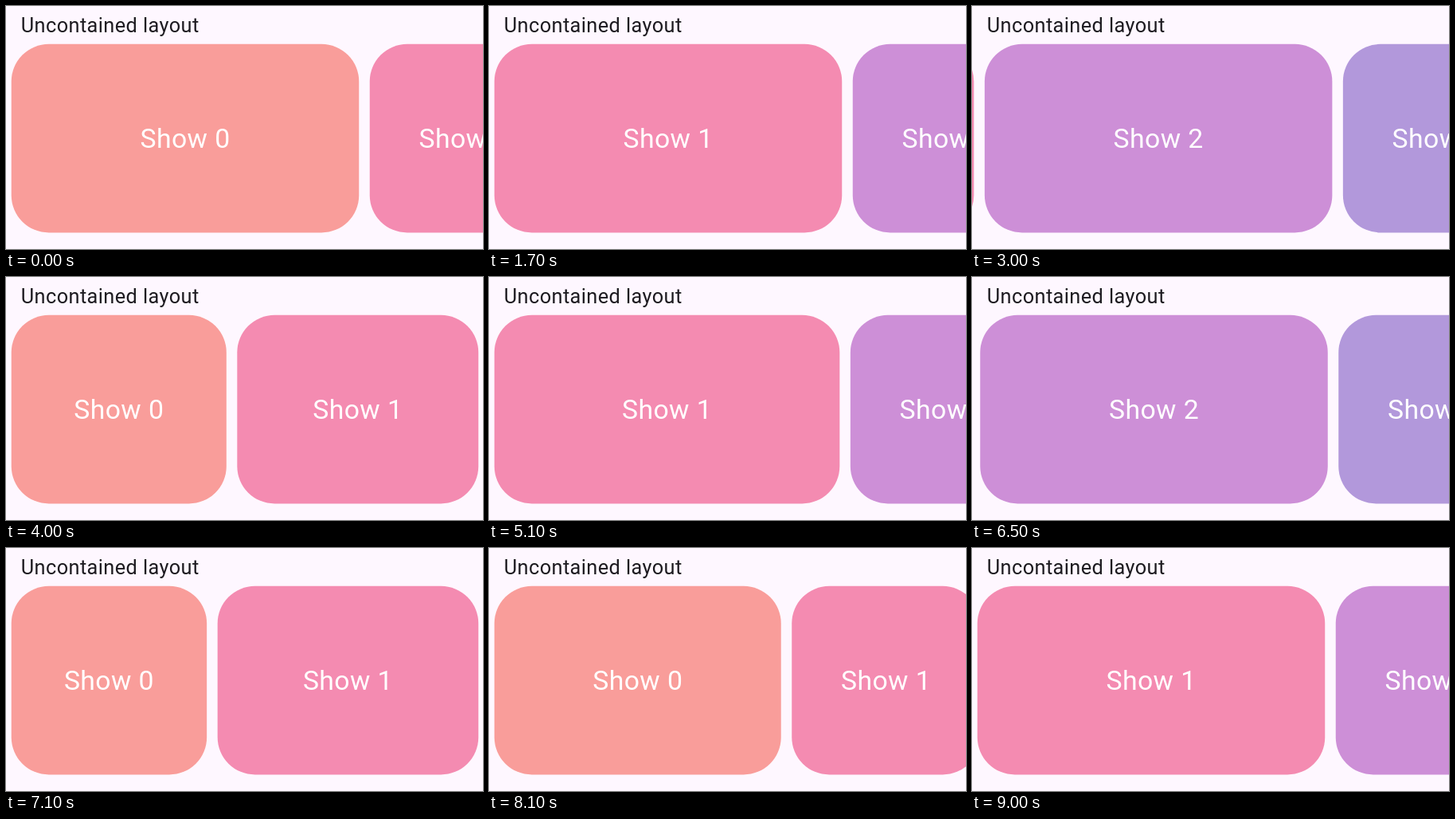
Animation of 599x305 px, one loop 9.2 s. Source, as an HTML page:

```html
<!DOCTYPE html>
<html lang="en">
<head>
<meta charset="utf-8">
<title>Uncontained layout</title>
<style>
  html, body { margin: 0; width: 100%; height: 100%; overflow: hidden; background: #fef7ff; }
  svg { display: block; width: 599px; height: 305px; font-family: Roboto, sans-serif; letter-spacing: .42px; }
  .title { font-size: 25.3px; fill: #1d1b20; }
  .label { font-size: 33.75px; fill: #fff; text-anchor: middle; }
</style>
</head>
<body>
<svg id="stage" viewBox="0 0 599 305">
  <text class="title" x="18.8" y="33">Uncontained layout</text>
</svg>
<script>
const LOOP = 9200, TICK = 100;
const VIEW = 600, EXTENT = 450, SHRUNK = 250, PAD = 6.75;
const COLORS = ['#f99d9a', '#f48bb1', '#cd8fd7', '#b298db'];

// Each move eases between item indexes; rise and settle shape its curve.
const MOVES = [
  { start: 900,  steps: 6,  from: 0, to: 1, rise: 1.8, settle: 3.1 },
  { start: 2100, steps: 6,  from: 1, to: 2, rise: 1.8, settle: 3.1 },
  { start: 2900, steps: 8,  from: 2, to: 0, rise: 4,   settle: 2.6 },
  { start: 3900, steps: 6,  from: 0, to: 1, rise: 1.8, settle: 3.1 },
  { start: 5100, steps: 13, from: 1, to: 2, rise: 2.4, settle: 3.06 },
  { start: 6500, steps: 11, from: 2, to: 0, rise: 3,   settle: 5.2 },
  { start: 7800, steps: 13, from: 0, to: 1, rise: 2.4, settle: 3.06 }
];

const stage = document.getElementById('stage');

function add(tag, attrs) {
  const el = document.createElementNS('http://www.w3.org/2000/svg', tag);
  for (const name in attrs) el.setAttribute(name, attrs[name]);
  return stage.appendChild(el);
}

const cards = COLORS.map((fill, i) => {
  const box = add('rect', { y: 47.8, height: 236.6, rx: 47, fill });
  const label = add('text', { class: 'label', y: 177.8 });
  label.textContent = 'Show ' + i;
  return { box, label };
});

const clamp = (v, lo, hi) => Math.min(hi, Math.max(lo, v));

function scrollAt(time) {
  const move = MOVES.filter(m => m.start <= time).pop();
  if (!move) return 0;
  const u = Math.min(1, ((time - move.start) / TICK + 1) / move.steps);
  const eased = 1 - (1 - u ** move.rise) ** move.settle;
  return EXTENT * (move.from + (move.to - move.from) * eased);
}

function draw(scroll) {
  cards.forEach(({ box, label }, i) => {
    let start = i * EXTENT - scroll;
    let width;
    if (start < 0) {
      // A leaving card stays pinned until it is fully shrunk.
      const end = start + EXTENT;
      width = Math.max(SHRUNK, end);
      start = end - width;
    } else {
      width = clamp(VIEW - start, SHRUNK, EXTENT);
    }
    box.setAttribute('x', start + PAD);
    box.setAttribute('width', width - 2 * PAD);
    label.setAttribute('x', start + width / 2);
  });
}

const origin = performance.now();

function frame() {
  const time = (performance.now() - origin) % LOOP;
  draw(scrollAt(Math.floor(time / TICK) * TICK));
  requestAnimationFrame(frame);
}
frame();
</script>
</body>
</html>
```
